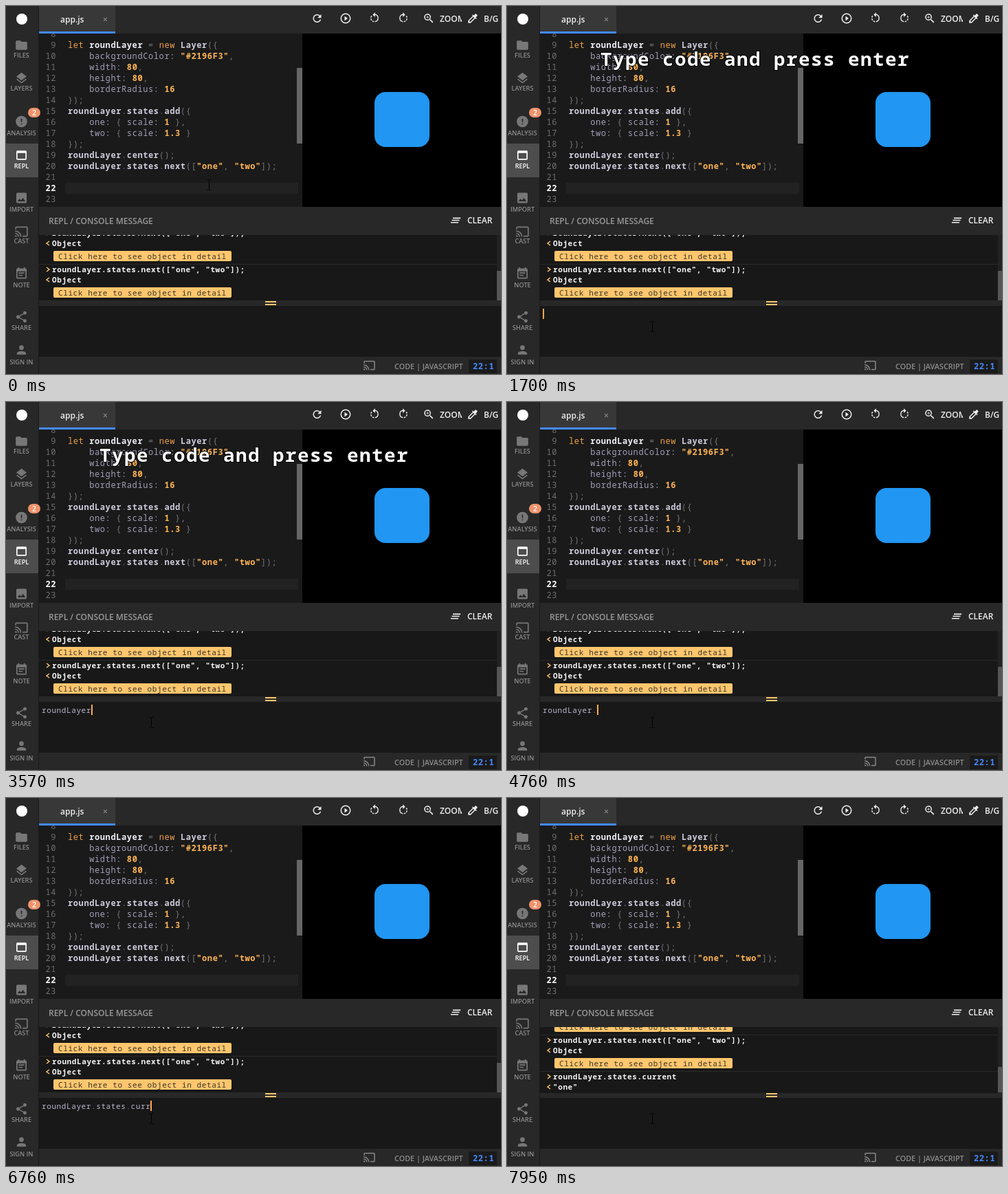
An HTML page for the animation above (8000 ms loop, 720x535 px).

```html
<!DOCTYPE html>
<html lang="en">
<head>
<meta charset="utf-8">
<title>REPL console</title>
<style>
html, body { margin: 0; width: 100%; height: 100%; overflow: hidden; background: #181818; }
svg { display: block; width: 720px; height: 535px; }
text { font: 600 12px "Open Sans", "Noto Sans", sans-serif; white-space: pre; }
.code, .log, #input, #caption { font-family: "Noto Sans Mono", "DejaVu Sans Mono", monospace; }
.code { font-size: 12px; font-weight: 400; letter-spacing: .6px; }
.log, #input { font-size: 11px; letter-spacing: .6px; }
.log { font-weight: 700; fill: #f4f4f4; }
.button { font-weight: 400; fill: #3a352b; }
#input { font-weight: 400; fill: #bcb8ce; }
#caption { font-size: 27.5px; font-weight: 700; letter-spacing: 1.5px; fill: #fff;
  stroke: #000; stroke-width: 2px; paint-order: stroke; }
.side { font-size: 9.2px; text-anchor: middle; }
.num { text-anchor: end; fill: #6e6e6e; }
.val { fill: #ffb454; font-weight: 700; }
.key { fill: #eda04b; }
.prop { fill: #a39fba; }
.id { fill: #cfccdd; font-weight: 600; }
.decl { fill: #f0eef6; font-weight: 700; }
.p { fill: #75757a; }
</style>
</head>
<body>
<svg id="stage" viewBox="0 0 720 535"></svg>
<script>
const ICONS = {
  folder: 'M10 4H4c-1.1 0-2 .9-2 2v12c0 1.1.9 2 2 2h16c1.1 0 2-.9 2-2V8c0-1.1-.9-2-2-2h-8z',
  layers: 'M12 18.5l-7.4-5.7L3 14l9 7 9-7-1.6-1.2zM12 16l9-7-9-7-9 7z',
  alert: 'M12 2a10 10 0 1 0 0 20 10 10 0 0 0 0-20zm1 15h-2v-2h2zm0-4h-2V7h2z',
  window: 'M19 4H5a2 2 0 0 0-2 2v12a2 2 0 0 0 2 2h14a2 2 0 0 0 2-2V6a2 2 0 0 0-2-2zm0 14H5V8h14z',
  photo: 'M21 19V5a2 2 0 0 0-2-2H5a2 2 0 0 0-2 2v14a2 2 0 0 0 2 2h14a2 2 0 0 0 2-2zM8.5 13.5l2.5 3 3.5-4.5 4.5 6H5z',
  cast: 'M21 3H3a2 2 0 0 0-2 2v3h2V5h18v14h-7v2h7a2 2 0 0 0 2-2V5a2 2 0 0 0-2-2zM1 18v3h3a3 3 0 0 0-3-3zm0-4v2a5 5 0 0 1 5 5h2a7 7 0 0 0-7-7zm0-4v2a9 9 0 0 1 9 9h2a11 11 0 0 0-11-11z',
  note: 'M17 10H7v2h10zm2-7h-1V1h-2v2H8V1H6v2H5a2 2 0 0 0-2 2v14a2 2 0 0 0 2 2h14a2 2 0 0 0 2-2V5a2 2 0 0 0-2-2zm0 16H5V8h14zm-5-5H7v2h7z',
  share: 'M18 16c-.8 0-1.5.3-2 .8l-7.1-4.1a3 3 0 0 0 0-1.4L16 7.2A3 3 0 1 0 15.1 5.7L8 9.8a3 3 0 1 0 0 4.4l7.1 4.1A2.9 2.9 0 1 0 18 16z',
  person: 'M12 12a4 4 0 1 0 0-8 4 4 0 0 0 0 8zm0 2c-2.7 0-8 1.3-8 4v2h16v-2c0-2.7-5.3-4-8-4z',
  refresh: 'M17.65 6.35A8 8 0 1 0 19.7 14h-2.1A6 6 0 1 1 16.2 7.8L13 11h7V4z',
  play: 'M10 16.5l6-4.5-6-4.5zM12 2a10 10 0 1 0 0 20 10 10 0 0 0 0-20zm0 18a8 8 0 1 1 0-16 8 8 0 0 1 0 16z',
  rotate: 'M7.1 8.5L5.7 7.1A8 8 0 0 0 4.1 11h2a6 6 0 0 1 1-2.5zM6.1 13h-2a8 8 0 0 0 1.6 3.9l1.4-1.4a6 6 0 0 1-1-2.5zm1 5.3a8 8 0 0 0 3.9 1.6v-2a6 6 0 0 1-2.5-1zM13 4.1V1L8.5 5.5 13 10V6.1a6 6 0 0 1 0 11.8v2a8 8 0 0 0 0-15.8z',
  zoom: 'M15.5 14h-.8l-.3-.3A6.5 6.5 0 1 0 13.7 14.4l.3.3v.8l5 5 1.5-1.5zm-6 0a4.5 4.5 0 1 1 0-9 4.5 4.5 0 0 1 0 9zM12 10h-2v2H9v-2H7V9h2V7h1v2h2z',
  dropper: 'M20.7 5.6l-2.3-2.3a1 1 0 0 0-1.4 0l-3.1 3.1L12 4.5l-1.5 1.4 1.4 1.4L3 16.2V21h4.8l8.9-8.9 1.4 1.4 1.4-1.4-1.9-1.9L20.7 7a1 1 0 0 0 0-1.4zM6.9 19L5 17.1 13 9l2 1.9z',
  clear: 'M5 13h14v-2H5zm-2 4h14v-2H3zM7 7v2h14V7z'
};

const rect = (x, y, w, h, fill, more = '') =>
  `<rect x="${x}" y="${y}" width="${w}" height="${h}" fill="${fill}" ${more}/>`;
const text = (x, y, s, more = '') => `<text x="${x}" y="${y}" ${more}>${s}</text>`;
const icon = (name, cx, cy, size, fill = '#eee', flip = 1) =>
  `<path d="${ICONS[name]}" fill="${fill}" fill-rule="evenodd" transform="translate(${cx} ${cy}) scale(${flip * size / 24} ${size / 24}) translate(-12 -12)"/>`;

// Editor
const SOURCE = `let roundLayer = new Layer({
    backgroundColor: "#2196F3",
    width: 80,
    height: 80,
    borderRadius: 16
});
roundLayer.states.add({
    one: { scale: 1 },
    two: { scale: 1.3 }
});
roundLayer.center();
roundLayer.states.next(["one", "two"]);`.split('\n');
const TOKEN = /("[^"]*"|\b\d[\d.]*)|(\b(?:let|new)\b)|(\w+:)|(roundLayer(?= =))|([a-z]\w*)|([^\w\s"]+)/gi;
const KINDS = ['val', 'key', 'prop', 'decl', 'id', 'p'];
const paint = line => line.replace(TOKEN, (s, ...groups) =>
  `<tspan class="${KINDS[groups.findIndex(g => g !== undefined)]}">${s}</tspan>`);

function editor() {
  let out = rect(48, 40, 383, 252, '#1a1a1a') + rect(86, 257, 339, 16, '#222');
  for (let n = 8; n <= 23; n++) {
    const y = 61 + (n - 9) * 16;
    out += text(73, y, n, `class="code num" ${n === 22 ? 'style="fill:#fff;font-weight:700"' : ''}`);
    if (SOURCE[n - 9]) out += text(90, y, paint(SOURCE[n - 9]), 'class="code"');
  }
  return out + rect(423, 90, 8, 110, '#666') + rect(90, 257, 2, 16, '#ffa94d', 'id="editCaret"');
}

function topBar() {
  return rect(48, 0, 672, 40, '#282828') + rect(48, 0, 111, 40, '#383838') + rect(48, 37, 111, 3, '#448aff') +
    text(79, 24, 'app.js', 'fill="#eee"') + text(141, 24, '×', 'fill="#888"') +
    rect(431, 40, 289, 252, '#000') + rect(536, 125, 80, 80, '#2196f3', 'rx="16"') +
    icon('refresh', 452.5, 18, 18) + icon('play', 494, 18, 18) + icon('rotate', 536, 17.5, 18) +
    icon('rotate', 578, 17.5, 18, '#eee', -1) + icon('zoom', 615, 18, 18) +
    text(631, 23, 'ZOOM', 'fill="#eee"') + rect(663, 8, 8, 20, '#282828') +
    icon('dropper', 679, 18, 18) + text(695, 23, 'B/G', 'fill="#eee"');
}

function sidebar() {
  const items = [['folder', 'FILES', 57, 75], ['layers', 'LAYERS', 105, 123], ['alert', 'ANALYSIS', 168, 188],
    ['window', 'REPL', 217, 236], ['photo', 'IMPORT', 279, 299], ['cast', 'CAST', 328, 345],
    ['note', 'NOTE', 389, 409], ['share', 'SHARE', 452, 471], ['person', 'SIGN IN', 500, 521]];
  return rect(0, 0, 47, 535, '#282828') + rect(47, 0, 1, 535, '#1a1a1a') + rect(0, 200, 47, 49, '#4d4d4d') +
    '<circle cx="23" cy="19" r="8" fill="#fff"/>' +
    items.map(([name, label, iy, ty]) => {
      const on = name === 'window';
      return icon(name, 22.5, iy, 20, on ? '#fff' : '#777') +
        text(22.5, ty, label, `class="side" fill="${on ? '#fff' : '#8c8c8c'}"`);
    }).join('') +
    rect(32, 148, 18, 14, '#f0936b', 'rx="7"') +
    text(41, 159, 2, 'fill="#fff" style="font-size:10.5px;text-anchor:middle"');
}

// Console
const chevron = (y, dir) =>
  `<path d="M${61 - 2 * dir} ${y - 3}l${4 * dir} 3l${-4 * dir} 3" fill="none" stroke="#ffc66d" stroke-width="1.5"/>`;
const entry = (y, command, result, button) =>
  rect(48, y - 12, 666, 1, '#292929') + chevron(y - 4, 1) + text(67, y, command, 'class="log"') +
  chevron(y + 11, -1) + text(67, y + 15, result, 'class="log"') +
  (button ? rect(69, y + 22, 259, 15, '#ffc66d', 'rx="2"') +
    text(76, y + 34, 'Click here to see object in detail', 'class="log button"') : '');

const NEXT = 'roundLayer.states.next(["one", "two"]);';
const TYPED = 'roundLayer.states.current';

function consolePane() {
  return rect(48, 292, 672, 41, '#282828') + text(62, 317, 'REPL / CONSOLE MESSAGE', 'fill="#999"') +
    icon('clear', 654, 311.5, 19) + text(671, 316, 'CLEAR', 'fill="#eee"') +
    rect(48, 333, 672, 96, '#181818') +
    '<clipPath id="clip"><rect x="48" y="333" width="672" height="96"/></clipPath><g clip-path="url(#clip)"><g id="log">' +
    entry(334, NEXT, 'Object', true) + entry(387, NEXT, 'Object', true) + entry(440, TYPED, '"one"') +
    '</g></g>' + rect(714, 333, 6, 96, '#222') + rect(714, 385, 6, 43, '#555', 'id="thumb"') +
    rect(48, 429, 672, 7, '#282828') + rect(377, 429, 16, 2, '#ffc66d') + rect(377, 433, 16, 2, '#ffc66d') +
    rect(48, 436, 672, 74, '#181818') + rect(182, 440, 50, 15, '#3d3d46', 'id="mark"') +
    text(52, 452, '', 'id="input"') + rect(52, 440, 2, 15, '#ffa94d', 'id="caret"') +
    rect(48, 510, 672, 25, '#282828') + icon('cast', 528.5, 522.5, 18, '#888') +
    text(565, 528, 'CODE | JAVASCRIPT', 'fill="#8c8c8c" style="font-size:10.8px"') +
    rect(673, 514, 41, 20, '#1a1a1a') +
    text(679, 528, '22:1', 'class="code" fill="#448aff" style="font-weight:600"');
}

const $ = id => document.getElementById(id);
$('stage').innerHTML = editor() + topBar() + consolePane() + sidebar() +
  text(136, 87, 'Type code and press enter', 'id="caption"') +
  '<path id="mouse" d="M-3-7.5h2l1 1 1-1h2M0-6.5v13M-3 7.5h2l1-1 1 1h2" fill="none" stroke="#000"/>';

// Timeline, in ms
const LOOP = 8000, ENTER = 7400;
const KEYS = [1820, 1930, 2150, 2260, 2480, 2820, 3140, 3250, 3360, 3460, 4660,
  5520, 5630, 5740, 5850, 5970, 6080, 6210, 6410, 6520, 6630, 6750, 6860, 6970, 7090];
const CARET = [[710, 1150], [1700, 4120], [4660, 5090], [5520, 7950]];
const MOUSE = [[0, 295, 260], [160, 277, 305], [270, 250, 385], [380, 222, 477], [490, 211, 465], [1150, 211, 466]];

const show = (id, on) => $(id).setAttribute('visibility', on ? 'visible' : 'hidden');

function frame(now) {
  const t = now % LOOP;
  const within = (a, b) => t >= a && t < b;
  const done = t >= ENTER;
  const count = done ? 0 : KEYS.filter(k => k <= t).length;
  $('input').innerHTML = TYPED.slice(0, count).replace(/\./g, '<tspan class="p">.</tspan>');
  $('caret').setAttribute('x', Math.round(52 + count * 7.2));
  show('caret', CARET.some(([a, b]) => within(a, b)));
  show('editCaret', within(380, 710));
  show('caption', within(930, 4460));
  show('mark', within(7300, ENTER));
  $('log').setAttribute('transform', `translate(0 ${done ? -31 : 0})`);
  $('thumb').setAttribute('y', done ? 391 : 385);
  $('thumb').setAttribute('height', done ? 37 : 43);
  const [, x, y] = MOUSE.filter(m => m[0] <= t).pop();
  $('mouse').setAttribute('transform', `translate(${x + .5} ${y})`);
  requestAnimationFrame(() => frame(performance.now() - start));
}
const start = performance.now();
frame(0);
</script>
</body>
</html>
```
